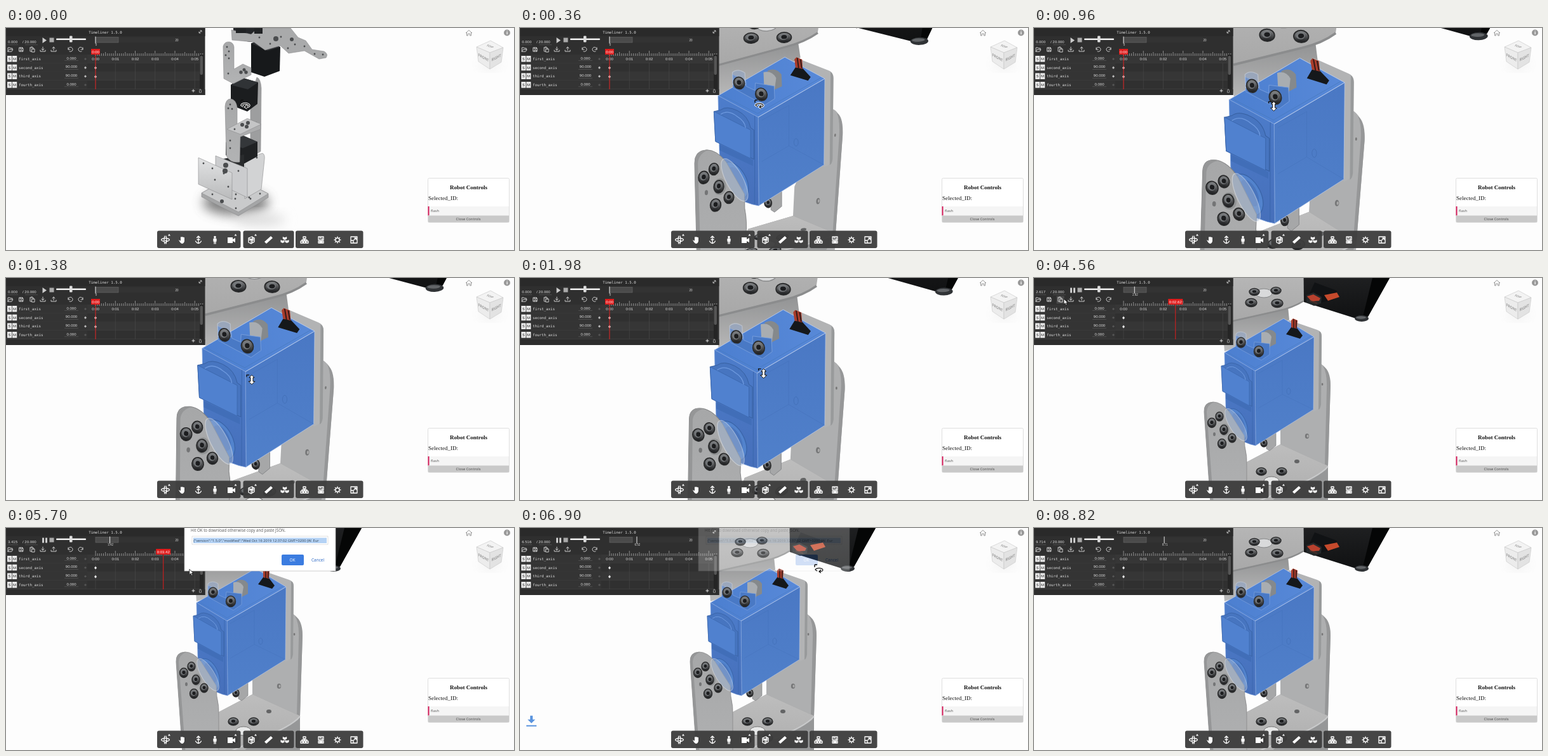
Write an HTML page that moves like this. It is 800 px wide and 351 px high and loops after 8.88 s.

```html
<!DOCTYPE html>
<html lang="en">
<head>
<meta charset="utf-8">
<title>Robot timeline editor</title>
<style>
html,body{margin:0;width:100%;height:100%;overflow:hidden;background:#fdfdfd}
svg{display:block;width:100%;height:100%}
.mono{font-family:"DejaVu Sans Mono",monospace;font-size:5.8px;fill:#ddd}
.num{font-family:"Liberation Sans",Arial,sans-serif;font-size:6px;fill:#ddd}
.sans{font-family:"Open Sans","Noto Sans",sans-serif}
.serif{font-family:"Liberation Serif",serif}
.mid{text-anchor:middle}
.ico{fill:none;stroke:#fff;stroke-width:1.3;stroke-linejoin:round;stroke-linecap:round}
</style>
</head>
<body>
<svg id="stage" viewBox="0 0 800 351" preserveAspectRatio="none" xmlns="http://www.w3.org/2000/svg"></svg>
<script>
const LOOP = 8880, PLAY = 2990, OPEN = 5040, CLOSE = 6840, RATE = 1.666;
const stage = document.getElementById('stage');

const rect = (x, y, w, h, fill, more = '') => `<rect x="${x}" y="${y}" width="${w}" height="${h}" fill="${fill}" ${more}/>`;
const path = (d, fill, more = '') => `<path d="${d}" fill="${fill}" ${more}/>`;
const oval = (x, y, rx, ry, fill, more = '') => `<ellipse cx="${x}" cy="${y}" rx="${rx}" ry="${ry}" fill="${fill}" ${more}/>`;
const label = (x, y, s, cls, more = '') => `<text x="${x}" y="${y}" class="${cls}" ${more}>${s}</text>`;
const icon = (x, y, d, more = '') => `<path class="ico" transform="translate(${x} ${y})" d="${d}" ${more}/>`;
const group = (id, body, more = '') => `<g id="${id}" ${more}>${body}</g>`;
const grad = (id, a, b, dir = 'x2="0" y2="1"') =>
  `<linearGradient id="${id}" x1="0" y1="0" ${dir}><stop stop-color="${a}"/><stop offset="1" stop-color="${b}"/></linearGradient>`;
const screw = (x, y, rx, ry = rx) => oval(x, y, rx, ry, 'url(#steel)', 'stroke="#2a2b2c" stroke-width="1.4"') +
  oval(x - rx * .1, y - ry * .15, rx * .62, ry * .6, '#74777a') + oval(x, y - ry * .1, rx * .4, ry * .38, '#1c1d1f');

const defs = `<defs>
${grad('metal', '#bdbdbd', '#a8a8a8')}${grad('plate', '#a6a7a8', '#b2b3b4')}${grad('under', '#919293', '#bcbcbc')}
${grad('ink', '#2b2c2e', '#101112')}${grad('steel', '#8b8d8f', '#17181a')}${grad('blueTop', '#4c7fd0', '#5889d8', 'x2="1" y2="0"')}
${grad('blueL', '#4d7dcb', '#466fba')}${grad('blueR', '#4a78c4', '#5080ca')}${grad('pale', '#e2e3e4', '#b9babb')}
<filter id="blur" x="-50%" y="-50%" width="200%" height="200%"><feGaussianBlur stdDeviation="9"/></filter>
<clipPath id="panelClip"><rect width="313" height="98"/></clipPath></defs>`;

// ---------- wide view of the robot ----------
function wideRobot() {
  const dot = (x, y, r = 1.4) => oval(x, y, r, r, '#4b4d4f');
  const dots = (...p) => p.map(([x, y]) => dot(x, y)).join('');
  const plate = (d, f = 'url(#metal)') => path(d, f, 'stroke="#8b8c8d" stroke-width=".6"');
  return oval(362, 276, 52, 20, '#555', 'filter="url(#blur)" opacity=".75"') +
    oval(400, 303, 40, 10, '#ddd', 'filter="url(#blur)"') +
    plate('M308 261L357 233L413 262V268L366 297L308 267Z', '#a5a6a7') + plate('M308 261L357 233L413 262L366 291Z', '#c9cacb') +
    dots([325, 263], [340, 274], [362, 285], [385, 270], [400, 262], [361, 270]) + dot(340, 274, 3) +
    plate('M376 207L404 198Q408 200 407 208L402 255L376 270Z', '#d2d3d4') +
    plate('M395 78Q401 80 402 95L401 195L385 205V110Z', '#9d9e9f') + dots([393, 190], [394, 150], [395, 205]) +
    path('M346 181L371 169L396 180V203L374 215L346 201Z', '#202224') + path('M346 181L371 169L396 180L373 190Z', '#34373a') +
    path('M337 208L375 200V235L337 225Z', '#292b2d') +
    plate('M330 202L380 222V268L330 244Z', '#cbccce') + plate('M303 205L356 229V271L303 247Z', 'url(#pale)') +
    dots([311, 214], [325, 222], [343, 230], [329, 240], [350, 251], [362, 263], [383, 268], [366, 226]) + dot(345, 226, 4) + dot(346, 217, 4) +
    path('M354 90L370 78L397 86L396 120L380 132L354 122Z', '#1b1d1f') + path('M354 90L370 78L397 86L381 97Z', '#303336') +
    plate('M345 124Q346 112 354 112Q362 113 364 125V157L385 145L401 152V160L369 172L368 212Q353 214 347 202Z', 'url(#plate)') +
    plate('M348 160L380 143L402 152L369 168Z', '#c4c5c6') +
    dots([353, 121], [350, 127], [356, 128], [353, 178], [353, 190], [360, 160]) + dot(372, 153, 3) + dot(379, 156, 3) + dot(381, 150, 3) +
    path('M358 0H420V20L384 22L358 17Z', '#242629') + path('M386 24L432 30L431 68L407 77L386 70Z', '#17191b') +
    path('M386 24L404 17L432 30L412 36Z', '#2e3033') +
    plate('M342 29Q344 21 352 22Q358 23 359 30V65L373 57L386 63V74L358 88L343 80Z', 'url(#plate)') +
    dots([348, 30], [351, 37], [346, 43], [351, 48], [350, 72]) + dot(370, 70, 2.7) + dot(378, 70, 2.7) + dot(375, 66, 2.5) +
    plate('M355 3L386 10L397 0H448L460 15L472 20L482 34L501 37Q508 41 504 47L493 49L470 36L445 40L432 28L408 35L390 22L356 19Z', '#a9aaab') +
    dots([399, 15], [416, 25], [433, 14], [444, 32], [455, 26], [470, 29], [486, 41], [499, 42]) + dot(425, 17, 4) + dot(450, 18, 3) +
    path('M362 0H378V8H362ZM391 0H404V9H391Z', '#202224');
}

// ---------- close view, laid out in its final resting pose ----------
const closeParts = {
  beam: path('M296 66L400 46L402 66L335 104L300 116Z', 'url(#under)') + path('M280 -40H440L425 35Q408 47 384 51L300 70Z', 'url(#metal)') +
    path('M300 71L384 52Q408 47 425 36', 'none', 'stroke="#8b8c8d" stroke-width="2.5"') +
    oval(362, 24, 13, 7, '#d9dadb', 'stroke="#88898a"') + screw(342, 39, 9, 6.5) + screw(383, 40, 9, 6.5) + screw(347, 22, 8, 5.5) + screw(381, 20, 8, 5.5),
  motor: path('M424 -60H590L559 2L526 61Q518 67 507 64L425 38Z', 'url(#ink)') + path('M570 -20L559 2L526 61L517 65L533 0Z', '#050606') +
    oval(516, 64, 11, 5, '#303336') + oval(515, 62.5, 8, 2.2, '#626568') +
    path('M442 7L477 20L472 34L447 40L431 31Z', '#101214') + path('M429 27L440 23L453 30L452 40L441 44L429 39Z', '#24282a') +
    path('M430 29L440 26L451 32L449 36L437 37Z', '#b8412e') + path('M457 27L477 23L481 30L463 36Z', '#c54a2c') + path('M434 36L446 40', 'none', 'stroke="#48302b" stroke-width="2"'),
  arm: path('M440 130Q466 137 467 170L463 297V390H388V225Z', '#aeafb0') +
    path('M455 139Q462 150 461 175L458 295L463 297L467 170Q467 146 455 139Z', '#969798') +
    oval(430, 250, 3.2, 4, '#767778') + oval(431, 250, 1.5, 2.2, '#aaa') + oval(454, 168, 1.4, 2, '#777'),
  base: path('M388 263L463 297V390L335 400V291Z', '#969798') + path('M388 263L463 297L460 303Q440 319 390 338L335 390V291Z', 'url(#metal)') +
    path('M463 298Q448 315 398 334L346 356', 'none', 'stroke="#c8c9ca" stroke-width="2"') + oval(414, 290, 4, 3, '#636465') +
    oval(374, 321, 12, 7, '#e7e8e8', 'stroke="#777"') + screw(358, 306, 8, 6) + screw(390, 306, 8, 6) + screw(357, 335, 8, 6) + screw(390, 332, 8, 6),
  right: path('M366 250L381 245V265L371 273L366 270Z', '#a6a7a8', 'stroke="#77797b" stroke-width=".6"') + screw(362, 261, 5, 6) +
    path('M400 66L446 82Q453 84 453 92L452 200Q451 207 440 211Z', '#b2b3b4') + path('M449 84Q453 86 453 92L452 200Q451 207 448 208L449 90Z', '#989a9b') +
    path('M348 147L441 93L440 208L349 265Z', 'url(#blueR)', 'stroke="#b7c8e7" stroke-width=".6"') +
    path('M353 151L391 130V184L440 208M391 184L353 206', 'none', 'stroke="#426fb7" stroke-width=".6" opacity=".6"') + oval(401, 179, 3, 5, 'none', 'stroke="#426fb7" stroke-width=".7"'),
  top: path('M300 118L393 64L441 93L348 147Z', 'url(#blueTop)', 'stroke="#b9cbec" stroke-width=".7"') + path('M306 118L348 142L436 92', 'none', 'stroke="#477abf" stroke-width=".6"') +
    path('M405 78L414 79L423 91L419 96L397 89Z', '#15181b') + path('M405 67L408 64L415 67L414 80L405 78Z', '#a93c2b') + path('M409 65V79M413 67V79', 'none', 'stroke="#301a18" stroke-width="1.5"'),
  ears: path('M363 84Q374 78 381 88V104L371 109Z', '#85898c') + path('M358 86Q369 83 374 93L371 111L358 104Z', '#a9adb1') +
    path('M318 91L335 99V106L346 111L347 101L371 104V121L358 130L340 121L318 109Z', '#4979c5', 'stroke="#7ba1de" stroke-width=".7"') +
    path('M318 104V88Q325 82 334 88V104L326 110Z', '#8fa6cb', 'opacity=".55" stroke="#c8d4e8"') + screw(326, 102, 7, 8) + screw(354, 116, 7.5, 8.5),
  left: path('M300 118L348 147L349 265L341 263L318 254L303 244Z', 'url(#blueL)', 'stroke="#7299d9" stroke-width=".6"') +
    path('M344 145V263', 'none', 'stroke="#3c68ae" stroke-width=".8"') +
    path('M295 139L303 137Q310 131 323 138Q336 145 339 161L343 164V203L297 179Z', '#4775c0', 'stroke="#365f9f" stroke-width=".7"') +
    path('M295 139L339 164V202L297 179Z', '#5081cf', 'stroke="#3c68ae" stroke-width=".7"') + path('M303 143Q312 136 323 146Q332 152 333 161', 'none', 'stroke="#6d99df" stroke-width="1"') +
    oval(320, 231, 14, 26, '#5283cd', 'transform="rotate(-24 320 231)" stroke="#3b66aa"') + oval(322, 229, 8, 17, '#4975bd', 'transform="rotate(-24 322 229)"') +
    path('M302 183L342 204V212L302 191Z', '#416eb8'),
  fork: path('M268 212Q267 197 282 196Q295 196 307 211L331 249L332 266Q336 282 335 300V400H281Z', 'url(#plate)', 'stroke="#818283" stroke-width=".7"') +
    path('M268 212L281 400H286L272 212Q272 201 284 196Q267 195 268 212Z', '#959697') +
    oval(318, 232, 10, 29, '#9db2d2', 'transform="rotate(-31 318 232)" opacity=".5" stroke="#e2e8f0"') +
    oval(300, 240, 8, 10, '#929495') + screw(280, 229, 6.5, 7.5) + screw(292, 219, 6, 7) + screw(299, 240, 6, 7.5) + screw(296, 262, 6.5, 7.5) + screw(312, 253, 6, 7) + oval(284, 247, 2, 3, '#747576')
};

// Three anchor points per part: first close pose, closer pose, resting pose.
const anchors = {
  beam: [[364, 16, 416, 15, 411, -10], [366, 13, 419, 14, 414, -14], [342, 39, 383, 40, 380, 20]],
  motor: [[629, 22, 509, -6, 676, -59], [675, 17, 555, -13, 727, -66], [516, 65, 425, 38, 559, 0]],
  arm: [[430, 297, 508, 172, 497, 325], [432, 293, 516, 178, 504, 333], [388, 263, 467, 172, 463, 297]],
  base: [[430, 297, 497, 325, 378, 330], [432, 293, 504, 333, 378, 337], [388, 263, 463, 297, 358, 306]],
  right: [[375, 141, 480, 80, 376, 281], [377, 148, 486, 84, 378, 299], [348, 147, 441, 93, 349, 265]],
  top: [[375, 141, 480, 80, 312, 107], [377, 148, 486, 84, 309, 111], [348, 147, 441, 93, 300, 118]],
  ears: [[345, 87, 380, 105, 398, 67], [344, 90, 380, 108, 398, 67], [326, 102, 354, 116, 370, 83]],
  left: [[375, 141, 312, 107, 376, 281], [377, 148, 309, 111, 378, 299], [348, 147, 300, 118, 349, 265]],
  fork: [[275, 214, 329, 268, 308, 280], [269, 222, 325, 285, 302, 294], [268, 212, 312, 253, 296, 262]]
};

function warp(a, b) {
  const [ux, uy, vx, vy] = [a[2] - a[0], a[3] - a[1], a[4] - a[0], a[5] - a[1]];
  const det = ux * vy - uy * vx;
  const row = i => {
    const p = b[2 + i] - b[i], q = b[4 + i] - b[i];
    const m = (p * vy - q * uy) / det, n = (q * ux - p * vx) / det;
    return [m, n, b[i] - m * a[0] - n * a[1]];
  };
  const x = row(0), y = row(1);
  return `matrix(${x[0]} ${y[0]} ${x[1]} ${y[1]} ${x[2]} ${y[2]})`;
}

// ---------- timeline panel ----------
function panel() {
  let s = rect(0, 0, 313.5, 106, '#2f2f2f') + rect(0, 0, 313.5, 13, '#2a2a2a') + label(156.5, 9, 'Timeliner 1.5.0', 'mono mid') +
    path('M304 8L308 4M305.5 4H308V6.5M304 5.5V8H306.5', 'none', 'stroke="#ddd" stroke-width=".8"');
  s += label(3, 24, '0.000', 'num', 'id="clock"') + label(26, 24, '/ 20.000', 'num') + rect(2, 26, 17, .5, '#666') + rect(30, 26, 20, .5, '#666');
  s += group('playIcon', path('M57.5 15L64 19.5L57.5 24Z', '#ccc')) + group('pauseIcon', rect(57, 15.5, 3, 8, '#ccc') + rect(62, 15.5, 3, 8, '#ccc')) + rect(68.5, 15.5, 7, 7, '#aaa');
  s += rect(79, 16.5, 47, 2.5, '#f2f2f2', 'rx="1"') + rect(100, 12.5, 4.5, 10, '#ddd', 'rx="1"');
  s += rect(141, 14.5, 131, 8.5, '#333') + rect(141, 14.5, 36, 8.5, '#4b4b4b', 'stroke="#686868" stroke-width=".6"') +
    label(269, 21, '20', 'num mid', 'style="font-size:4.5px"') + rect(140.5, 13.5, 1, 11, '#eee', 'id="mark"') + label(143, 28, '0', 'num mid', 'id="markText" style="font-size:4.5px"');
  const tools = ['M-4 3V-3H-1L0-2H3V0M-4 3L-2 0H4L2 3Z', 'M-3-3H2L3-2V3H-3ZM-1.5-3V-1H1.5V-3M-1.5 3V1H1.5V3', 'M-3-3H2V0M-3-3V3H-1M0-1H4V4H0ZM-1.5-4H.5',
    'M0-4V1M-2-1L0 1L2-1M-4 1V3H4V1', 'M0 1V-4M-2-2L0-4L2-2M-4 1V3H4V1', 'M-3-3V0H0M-3 0A3.5 3.5 0 1 1-1 3', 'M3-3V0H0M3 0A3.5 3.5 0 1 0 1 3'];
  s += rect(35.5, 28.5, 12, 12, '#4a4a4a', 'id="hover"');
  [7, 24, 41, 58, 75, 101, 118].forEach((x, i) => s += icon(x, 34, tools[i], 'style="stroke:#ccc;stroke-width:1"'));
  ['first', 'second', 'third', 'fourth'].forEach((name, i) => {
    const y = 42 + i * 13.7, keyed = i === 1 || i === 2;
    s += rect(0, y, 128, 13.2, '#343434') + rect(128, y, 177, 13.2, i % 2 ? '#303030' : '#363636') + rect(0, y + 13.2, 305, .5, '#484848') +
      rect(2, y + 2, 7.2, 9.5, '#eee') + rect(10, y + 2, 7.2, 9.5, '#eee') +
      label(5.6, y + 9, 'S', 'num mid', 'style="fill:#222"') + label(13.6, y + 9, 'M', 'num mid', 'style="fill:#222"') +
      label(20, y + 9, name + '_axis', 'mono') + label(103, y + 7.5, keyed ? '90.000' : '0.000', 'num mid') + rect(92, y + 9.5, 22, .5, '#666') +
      path(`M125 ${y + 5}l2 2l-2 2l-2-2Z`, '#555') + (keyed ? path(`M125 ${y + 4.8}l1.9 2.2l-1.9 2.2l-1.9-2.2Z`, '#bbb', 'class="atKey"') : '');
  });
  let ticks = '', grid = '';
  for (let i = 0; i < 55; i++) ticks += `M${141 + i * 3.125} 44v${i % 10 ? i % 5 ? -4 : -6 : -8}`;
  for (let i = 0; i < 6; i++) {
    grid += `M${141 + i * 31.25} 55V97`;
    s += label(141 + i * 31.25, 51, '0:0' + i, 'num mid');
  }
  s += path(grid, 'none', 'stroke="#484848" stroke-width=".7"') + path(ticks, 'none', 'stroke="#b5b5b5" stroke-width=".7"');
  s += [63, 77].map(y => path(`M141 ${y - 2.5}l2 2.5l-2 2.5l-2-2.5Z`, '#eee')).join('');
  s += rect(305, 42, 6, 55, '#252525') + rect(305.5, 44, 4.5, 30, '#555', 'rx="2"');
  s += `<g clip-path="url(#panelClip)">${group('needle', rect(-.5, 38, 1, 59, '#e01c1c') + rect(-7, 33, 14, 9, '#e01c1c', 'id="flag"') + label(0, 40, '0:00', 'num mid', 'id="flagText" style="fill:#fff"'))}</g>`;
  return s + rect(0, 97, 313.5, 9, '#2d2d2d') + path('M292.5 99.2h5M295 96.7v5', 'none', 'stroke="#ddd" stroke-width="1"') +
    path('M304 98h4M305 97h2M304.5 99V102h3V99', 'none', 'stroke="#aaa" stroke-width=".8"');
}

// ---------- viewer furniture ----------
function viewer() {
  let s = '';
  for (const [x, w] of [[238, 131.5], [373.5, 80], [456, 106.5]]) s += rect(x, 320.5, w, 27.5, '#3d3d3d', 'rx="3" opacity=".95"');
  const cubeIcon = 'M-3.2-5L0-3.8L3.2-5V-1.5L0 0L-3.2-1.5ZM-6.5 0L-3.3 1.2L-.5 0V3.5L-3.3 5L-6.5 3.5ZM.5 0L3.3 1.2L6.5 0V3.5L3.3 5L.5 3.5Z';
  const tools = ['M-2 2.4A6.3 2.6 0 1 1 2 2.4M2 2.4L0 .8M2 2.4L0 4M-1-6Q-3 0-1 6M1-6Q3 0 1 6', '', 'M0-6V5M-2.5-3.5L0-6L2.5-3.5M-4.5 2Q-3 5 0 5.5Q3 5 4.5 2M-2-.5H2',
    'M-2-1.5V2M2-1.5V2M-1-2H1V6M-1-2V6M0-2V2', '', 'M-5-3L0-5L4-3V3L-1 6L-5 4ZM-5-3L-1-1V6M-1-1L4-3M-5 0L4 0M1-5V4', '', '',
    'M-2-5H2V-2H-2ZM0-2V2M-4 2V0H4V2M-6 2H-2.5V5H-6ZM2.5 2H6V5H2.5ZM-1.5 2H1.5V5H-1.5Z', 'M-4-5H4V0H-4ZM-4 2H4V5H-4ZM-2-3H0M2-3V-1M-2 3.5H2', 'M-3 0A3 3 0 1 0 3 0A3 3 0 1 0-3 0M0-5V-3.5M0 3.5V5M-5 0H-3.5M3.5 0H5M-3.6-3.6L-2.5-2.5M2.5 2.5L3.6 3.6M-3.6 3.6L-2.5 2.5M2.5-2.5L3.6-3.6', 'M-5-5H5V5H-5ZM1-3H3.5V-.5M3-3L0 0M-5 1H-1V5'];
  [251, 277, 303, 329, 355, 387, 413, 439, 470, 496, 522, 548].forEach((x, i) => s += icon(x, 335, tools[i]));
  s += path('M272 335L275 336.5V331q1-2 2 0q1-2 2 0q2-1 2 1v5q-1 4-4 4q-3-1-5-6Z', '#fff') + oval(329, 330.5, 1.8, 1.8, '#fff') +
    path('M349 331h8v3l4-2v7l-4-2v3h-8Z', '#fff') + path('M407 338L417 329L420 332L410 341Z', '#fff') + path(cubeIcon, '#fff', 'transform="translate(439 335)"') +
    [257, 361.5, 393].map(x => path(`M${x} 325.5l2 3h-4Z`, '#fff')).join('');
  s += path('M724 8L729 3.5L734 8M725.5 7V12H727.5V9H730.5V12H732.5V7', 'none', 'stroke="#999" stroke-width="1"') +
    oval(789, 7.5, 5, 5, '#999') + label(789, 10.3, 'i', 'serif mid', 'style="font-size:8px;font-weight:bold;fill:#fff"');
  const face = 'stroke="#c6c6c6" stroke-width=".6" stroke-linejoin="round"';
  s += oval(762, 57, 15, 7, '#ccc', 'filter="url(#blur)" opacity=".35"') + path('M741 30L763 20L783 31L762 39Z', '#f3f3f3', face) +
    path('M741 30L762 39V65L744 53Z', '#ececec', face) + path('M783 31L762 39V65L780 54Z', '#e3e3e3', face);
  const cube = (t, m) => label(0, 2, t, 'sans mid', `transform="matrix(${m})" style="font-size:6.3px;font-weight:600;fill:#888"`);
  s += cube('TOP', '.85 .3 -.55 .5 762 29') + cube('FRONT', '.8 .45 .05 1 752 47') + cube('RIGHT', '.8 -.4 -.03 1 772 47');
  s += rect(664.5, 237.5, 128, 70, '#fff', 'rx="2" stroke="#dedede"') + label(728.5, 254.5, 'Robot Controls', 'serif mid', 'font-size="9" font-weight="bold" fill="#111"') +
    label(665, 272, 'Selected_ID:', 'serif', 'font-size="9" fill="#111"') + rect(665, 282, 127, 14.5, '#f5f5f5') + rect(664.5, 282, 2, 14.5, '#d5205d') +
    label(669, 291, 'flash', 'sans', 'font-size="5.8" fill="#555"') + rect(665, 296.5, 127, 10.5, '#c9c9c9') +
    label(728, 303.8, 'Close Controls', 'sans mid', 'font-size="5.8" fill="#444"');
  return s;
}

const dialog = rect(281, -4, 238, 72, '#fff', 'stroke="#bbb" stroke-width=".7"') +
  label(291, 5.5, 'Hit OK to download otherwise copy and paste JSON.', 'sans', 'font-size="6.2" fill="#555"') +
  rect(293, 13, 214, 13, '#fff', 'stroke="#ccc" stroke-width=".6"') + rect(295, 15.5, 210, 8.5, '#b4d2f5') +
  label(295, 22, '{"version":"1.5.0","modified":"Wed Oct 16 2019 12:37:02 GMT+0200 (W. Eur', 'sans', 'font-size="5.7" fill="#345"') +
  rect(434, 42, 35, 17, '#3b7ce0', 'rx="2"') + label(451, 52.8, 'OK', 'sans mid', 'font-size="6.5" fill="#fff"') + label(491, 52.8, 'Cancel', 'sans mid', 'font-size="6.5" fill="#2866c4"');

const orbitShape = 'M-3 3L-6 1A6 3 0 1 1 5 3L1 4M3 1L0 4L3 6';
const cursors = group('arrow', path('M0 0V8.5L2 6.7L3.5 10L5 9.3L3.6 6.2H6.3Z', '#fff', 'stroke="#111" stroke-width=".8"')) +
  group('orbit', path(orbitShape, 'none', 'stroke="#fff" stroke-width="3.2"') + path(orbitShape, 'none', 'stroke="#111" stroke-width="1.2"') + path('M-7-7V-3M-7-7H-3', 'none', 'stroke="#111" stroke-width="1.4"')) +
  group('dolly', path('M0-7L4-3H2V3H5L0 8L-5 3H-2V-3H-4Z', '#fff', 'stroke="#111" stroke-width="1"') + path('M-8-4V-7H-4', 'none', 'stroke="#111" stroke-width="1.3"'));

stage.innerHTML = defs + rect(0, 0, 800, 351, '#fdfdfd') + group('wide', wideRobot()) +
  group('close', Object.entries(closeParts).map(([id, body]) => group(id, body)).join('')) + viewer() + panel() +
  group('dialog', dialog) + group('download', path('M16 298h4v6h4l-6 6l-6-6h4ZM10 313h16v2H10Z', '#5b94de')) + group('cursor', cursors);

const el = {};
stage.querySelectorAll('[id]').forEach(node => el[node.id] = node);
const atKeys = stage.querySelectorAll('.atKey');
const clamp = v => Math.max(0, Math.min(1, v));
const mix = (a, b, k) => a + (b - a) * k;
const smooth = k => k * k * (3 - 2 * k);
const span = (t, a, b) => clamp((t - a) / (b - a));
const show = (node, on) => node.setAttribute('opacity', +on);

// keys: [time, ...values], eased between neighbours
function track(keys, t) {
  const i = keys.findIndex(k => k[0] > t);
  if (i < 0) return keys[keys.length - 1].slice(1);
  if (i === 0) return keys[0].slice(1);
  const a = keys[i - 1], b = keys[i], k = smooth(span(t, a[0], b[0]));
  return a.slice(1).map((v, j) => mix(v, b[j + 1], k));
}
const poseKeys = [[360, 0, 0], [960, 1.55, 0], [1380, 1, 0], [1840, 1.55, 0], [2400, 1, 1]];
const cursorKeys = [[0, 377, 121], [900, 377, 121], [1320, 387, 161], [1840, 387, 145], [2300, 372, 170], [2660, 61, 22], [3300, 61, 22], [4200, 47, 33], [5250, 47, 33],
  [6100, 490, 92], [6500, 452, 50], [6820, 452, 50], [6900, 471, 65], [7300, 471, 65], [8100, 448, 277], [8400, 425, 335]];

function drawScene(t) {
  const k = smooth(span(t, 30, 340)), s = 4.6 ** k, z = s / 4.6;
  const cx = mix(373, 395, k), cy = mix(105, 165, k);
  el.wide.setAttribute('transform', `translate(${cx} ${cy}) scale(${s}) translate(-373 -105)`);
  show(el.wide, k < .85);
  el.close.setAttribute('transform', `translate(${cx} ${cy}) scale(${z}) translate(-395 -165)`);
  el.close.setAttribute('opacity', span(k, .1, .4));
  const [near, rest] = track(poseKeys, t);
  for (const id in anchors) {
    const [a, b, c] = anchors[id];
    el[id].setAttribute('transform', warp(c, c.map((v, i) => mix(mix(a[i], b[i], near), v, rest))));
  }
}

function drawTimeline(t) {
  const playing = t >= PLAY, shown = t >= OPEN && t < CLOSE ? OPEN : t;
  const time = playing ? (shown - PLAY) / 1000 * RATE : 0;
  el.clock.textContent = time.toFixed(3);
  show(el.playIcon, !playing);
  show(el.pauseIcon, playing);
  atKeys.forEach(node => show(node, !playing));
  el.mark.setAttribute('x', 140.5 + time * 6.6);
  el.markText.setAttribute('x', 142 + time * 6.6);
  el.markText.textContent = playing ? time.toFixed(2) : '0';
  el.needle.setAttribute('transform', `translate(${141 + time * 31.25} 0)`);
  el.flagText.textContent = playing ? '0:0' + time.toFixed(2) : '0:00';
  el.flag.setAttribute('x', playing ? -11.5 : -7);
  el.flag.setAttribute('width', playing ? 23 : 14);
}

function drawPointer(t) {
  const [x, y] = track(cursorKeys, t), modal = t >= OPEN && t < CLOSE;
  const kind = modal || x < 313 ? 'arrow' : t > 960 && t < 2300 ? 'dolly' : 'orbit';
  for (const id of ['arrow', 'orbit', 'dolly']) show(el[id], id === kind);
  el.cursor.setAttribute('transform', `translate(${x} ${y})`);
  show(el.cursor, t < 8400);
  show(el.hover, t > 4100 && t < 5500);
  el.dialog.setAttribute('opacity', Math.min(span(t, OPEN, OPEN + 120), 1 - span(t, CLOSE - 40, CLOSE + 90)));
  const fall = span(t, CLOSE, 7200);
  el.download.setAttribute('transform', `translate(0 ${mix(-6, 22, fall)})`);
  el.download.setAttribute('opacity', t < CLOSE || fall >= 1 ? 0 : Math.min(1, (1 - fall) * 2));
}

const start = performance.now();
function frame() {
  const t = (performance.now() - start) % LOOP;
  drawScene(t);
  drawTimeline(t);
  drawPointer(t);
  requestAnimationFrame(frame);
}
frame();
</script>
</body>
</html>
```
